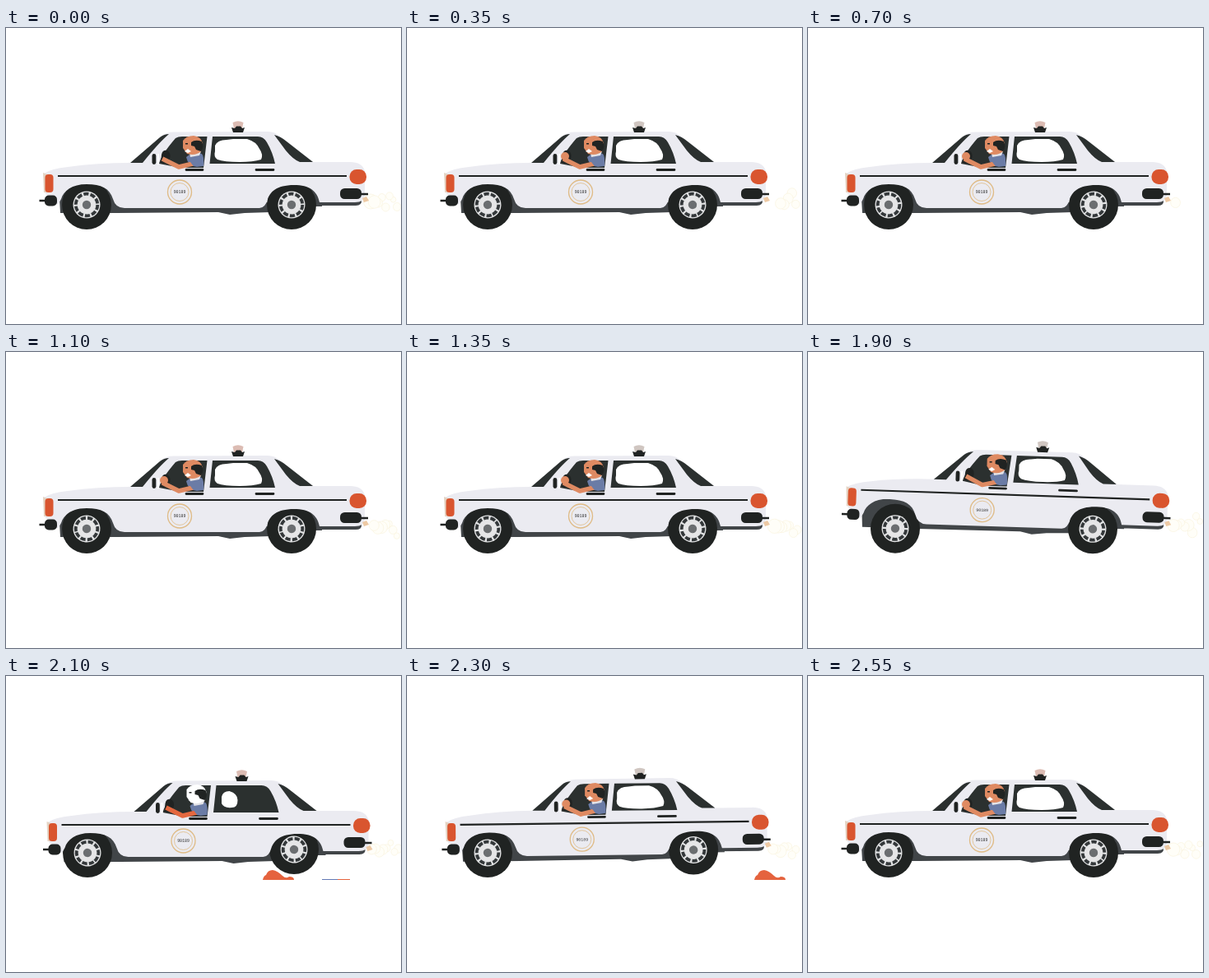
Animation, 480 px wide and 360 px high, one loop 2600 ms. Source, as an HTML page:

```html
<!DOCTYPE html>
<html lang="en">
<head>
<meta charset="utf-8">
<title>Patrol car</title>
<style>
  html, body { margin: 0; width: 100%; height: 100%; overflow: hidden; background: #fff; }
  svg { display: block; width: 480px; height: 360px; }
  .ink { fill: #202322; }
  .glass { fill: #2b302f; }
  .paint { fill: #ebebf1; }
  .red { fill: #d9552f; }
  .skin { fill: #df8a62; }
  .line { fill: none; stroke: #202322; }
  .badge { fill: none; stroke: #dfbb86; }
</style>
</head>
<body>
<svg viewBox="0 0 480 360">
  <defs>
    <g id="rim">
      <circle r="16.500" fill="#e2e3e4"/>
      <circle r="13.300" fill="none" stroke="#34383a" stroke-width="3.800" stroke-dasharray="6.200 2.157"/>
      <circle r="10" fill="#e6e6e7"/>
      <circle r="5.200" fill="#6b6e70"/>
    </g>
  </defs>
  <g id="smoke" fill="#fffef8" stroke="#f8f1da" stroke-width=".6"></g>
  <path id="pebble" class="red" d="M-5 1Q-4-4 1-4.500Q5-4 5 0Q3 5-3 4Z"/>
  <g id="lump">
    <path fill="#e5633e" d="M-19 0Q-18-5-15-6Q-13-12-7-12Q-1-11 5-5Q9-1 13-4Q19-4 19 0Z"/>
    <path d="M53-.5H72" stroke="#6379b5"/>
    <path d="M72-.5H87" stroke="#e5633e"/>
  </g>

  <!-- Underbody and wheel wells, behind the wheels -->
  <g id="chassis">
    <path fill="#414548" d="M64 190H136V225H66ZM130 212H322V224L290 225L272 227L258 224L134 225ZM314 192H384V217H320ZM374 209H432Q433 216 425 216H374Z"/>
  </g>
  <g id="front"><circle r="30" class="ink"/><use href="#rim"/></g>
  <g id="rear"><circle r="30" class="ink"/><use href="#rim"/></g>

  <g id="body">
    <path class="paint" d="M46 177Q55 171 75 169Q110 164 152 164L188 132Q194 126.500 204 126.500L318 126Q327 126 333 132L373 163H418Q433 163 436 174V204Q435 212 424 212H381C378 198 369 191 350 191C328 191 321 200 318 208Q315 219 308 219H144Q133 219 130 208C126 195 116 190 98 190C80 190 70 198 67 208L63 215Q57 206 48 202L46 190Z"/>
    <path class="glass" d="M151 164L187 133Q192 129 198 129Q186 139 166 164ZM186 165Q188 155 206 134Q209 132 214 132H244.500L240 170H212ZM251 132H306Q313 132 317 139Q324 151 327 165H247.500ZM326 130Q334 132 341 138L373 163H357Q349 160 340 149Z"/>
    <path id="wideGap" fill="#fff" d="M254 143Q257 136 268 136L276 135H293Q304 138 308 147Q313 154 310 160Q300 163 284 163Q265 163 257 160Q252 157 254 150Z"/>
    <path id="smallGap" fill="#fff" d="M257.500 146Q259 139 267 139Q277 142 277 150Q277 159 270 159Q260 160 257.500 154Z"/>

    <path class="ink" d="M189 154Q190 148 196 149Q201 152 199 159L193 164H188Z"/>
    <path fill="#6b7ca6" d="M219 157Q227 150 238 153Q241 156 240 168L232 169Q221 168 219 157Z"/>
    <path fill="#e4e3e7" d="M223 152L237 150L235 155L224 157Z"/>
    <path id="face" class="skin" d="M215 137Q219 131 228 131Q237 132 239 140L237 150Q230 156 220 153L215 146Z"/>
    <path class="ink" d="M225 139Q230 135 238 138Q241 144 237 150L231 148L229 144L225 143Z"/>
    <path d="M217 150L221 147L225 150L221 152Z" fill="#fff"/>
    <path class="ink" d="M218 140h3v1.500h-3z"/>
    <path id="arm" fill="none" stroke="#df8a62" stroke-width="5.500" stroke-linejoin="round" d="M190 159L210 169L227 165"/>
    <circle id="hand" class="skin" cx="192" cy="156" r="5"/>
    <path fill="#6b7ca6" d="M221 159Q229 155 236 160L238 168L227 167Z"/>

    <rect x="177.500" y="153" width="4.800" height="13" rx="2.400" class="ink"/>
    <path d="M185 153V166" stroke="#fff" stroke-width="2"/>
    <path class="line" stroke-width="2.200" d="M63 180H414"/>
    <path class="line" stroke-width="2.800" stroke-linecap="round" d="M219 172.500H239M304 172.500H325"/>

    <path fill="#e4d3c3" d="M45 176L50 178V200H46Z"/>
    <rect x="47.500" y="178" width="10" height="22" rx="4" class="red"/>
    <rect x="417.500" y="172" width="20.500" height="18" rx="8.500" class="red"/>
    <rect x="47" y="203.500" width="15" height="13" rx="5" class="ink"/>
    <rect x="406" y="195" width="26" height="13" rx="5.500" class="ink"/>
    <path class="line" stroke-width="2.500" d="M40.500 210H50M428 202H440"/>
    <path fill="#edc9a4" d="M433 207L438 205L441 210L435 212Z"/>

    <circle class="badge" cx="211" cy="199.500" r="14.500" stroke-width="1.300"/>
    <circle class="badge" cx="211" cy="199.500" r="11" stroke-width=".8"/>
    <text x="211" y="201.300" text-anchor="middle" font-family="'Liberation Mono', monospace" font-size="4.900" fill="#303030">90189</text>

    <path id="beacon" fill="#d9beb6" d="M275.500 115Q282 111.500 288.500 115L287 122H277Z"/>
    <path class="ink" d="M274 121L278 122L280 119.500H285L287 122L290 121L288 127H276Z"/>
  </g>
</svg>
<script>
const LOOP = 2600;
const el = id => document.getElementById(id);
const show = (id, on) => el(id).setAttribute('visibility', on ? 'visible' : 'hidden');
const move = (id, x, y) => el(id).setAttribute('transform', `translate(${x} ${y})`);

// time, body x, y, tilt, front wheel x, y, rear wheel x, y
const poses = [
  [0, 0, 0, 0, 98, 215, 347, 215],
  [1630, 0, 0, 0, 98, 215, 347, 215],
  [1750, 0, -1, 1.2, 101, 211, 347, 215],
  [1870, .6, -3, 1.9, 106, 214, 346, 215],
  [1920, .6, -2.8, 1.9, 106, 215, 346, 215.5],
  [2100, 4.5, 1, 0, 99, 215, 350, 211],
  [2220, 3, -4, -1.1, 98, 215, 349, 209],
  [2400, 0, 0, 0, 98, 215, 347, 215],
  [LOOP, 0, 0, 0, 98, 215, 347, 215]
];

function poseAt(t) {
  const i = poses.findIndex(p => p[0] > t);
  const a = poses[i - 1], b = poses[i];
  const u = (t - a[0]) / (b[0] - a[0]);
  const k = u * u * (3 - 2 * u);
  return a.map((v, j) => v + (b[j] - v) * k);
}

const random = n => { const v = Math.sin(n * 127.1) * 43758.5; return v - Math.floor(v); };
const puffs = Array.from({ length: 40 }, (_, i) => {
  const node = document.createElementNS('http://www.w3.org/2000/svg', 'ellipse');
  el('smoke').append(node);
  return { node, born: i * 65, rise: random(i) * 2 - 1, size: random(i + 60) };
}).filter(p => p.born < 230 || p.born > 640);

function drawSmoke(t) {
  for (const { node, born, rise, size } of puffs) {
    const age = ((t - born + LOOP) % LOOP) / 480;
    const r = age < 1 ? (5 + 4 * size) * (1 - .45 * age) : 0;
    node.setAttribute('cx', 443 + 34 * age);
    node.setAttribute('cy', 211 + rise * 14 * age);
    node.setAttribute('rx', r);
    node.setAttribute('ry', r * 1.05);
  }
}

function draw(now) {
  const t = Math.floor(now % LOOP / 50) * 50;
  const [, x, y, tilt, fx, fy, rx, ry] = poseAt(t);
  for (const id of ['chassis', 'body'])
    el(id).setAttribute('transform', `translate(${x} ${y}) rotate(${tilt} 347 200)`);
  move('front', fx, fy);
  move('rear', rx, ry);
  for (const rim of document.querySelectorAll('use'))
    rim.setAttribute('transform', `rotate(${-t / LOOP * 360 * 6})`);

  move('pebble', 55 + (t - 1600) * .55, 242);
  move('lump', 331 + (t - 2100) * .55, 248);
  show('pebble', t >= 1550 && t < 1750);
  show('lump', t >= 2050 && t < 2350);

  const jolt = t >= 2050 && t < 2200;
  show('wideGap', !jolt);
  show('smallGap', jolt);
  show('hand', t >= 150 && (t < 1850 || t >= 2200));
  el('face').style.fill = jolt ? '#fff' : '';
  el('arm').style.stroke = jolt ? '#e4683f' : '';
  el('beacon').style.fill = t % 500 < 250 ? '#dcbcb3' : '#d0c6c1';
  drawSmoke(t);
  requestAnimationFrame(() => draw(performance.now()));
}
draw(0);
</script>
</body>
</html>
```
